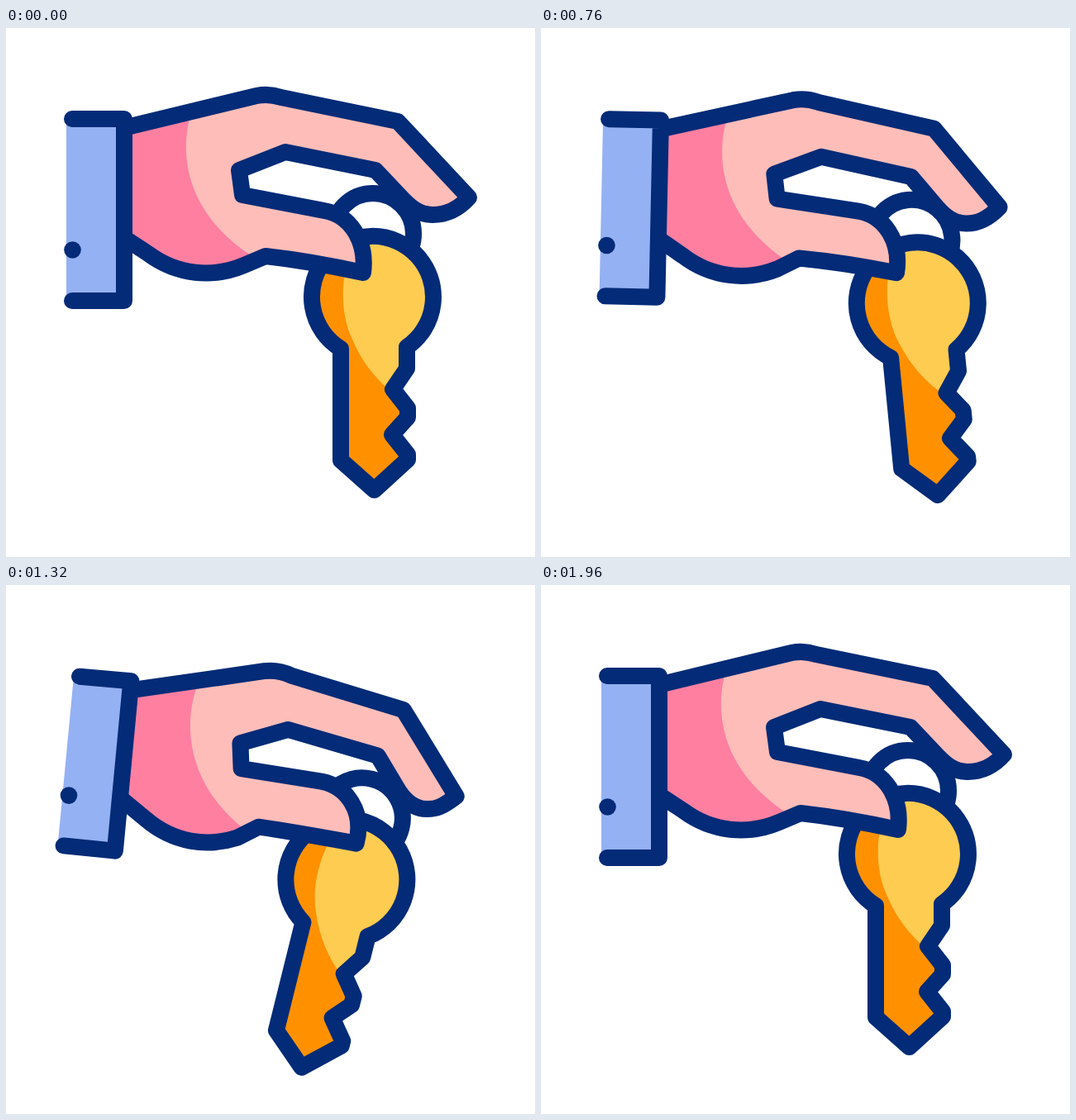
Recreate the animation shown at these times as an HTML page. Size 640 px wide and 640 px high, loop 2 s.

```html
<!DOCTYPE html>
<html lang="en">
<head>
<meta charset="utf-8">
<title>Handing over the key</title>
<style>
  html, body { margin: 0; width: 100%; height: 100%; overflow: hidden; background: #fff; }
  svg { display: block; width: 100%; height: 100%; }
  .line { fill: none; stroke: #032b77; stroke-width: 20; stroke-linecap: round; stroke-linejoin: round; }
</style>
</head>
<body>
<svg viewBox="0 0 640 640">
  <defs>
    <path id="keyShape" d="M405 388 A73.5 73.5 0 1 1 485 386 V412 L468 437 L486 460 V471 L467 492 L486 516 V522 L445.5 559 L405 523 Z"/>
    <path id="handShape"/>
    <clipPath id="inKey"><use href="#keyShape"/></clipPath>
    <clipPath id="inHand"><use href="#handShape"/></clipPath>
  </defs>

  <g id="key">
    <circle class="line" cx="444" cy="249" r="49"/>
    <use href="#keyShape" fill="#ffcc52"/>
    <path clip-path="url(#inKey)" fill="#ff9100" d="M429 245 C402 290 404 342 417 372 C429 402 445 422 466 440 L500 450 V570 H350 V245 Z"/>
    <use href="#keyShape" class="line"/>
  </g>

  <use href="#handShape" fill="#ffbdb9"/>
  <path id="shade" clip-path="url(#inHand)" fill="#ff7fa1"/>
  <use href="#handShape" class="line"/>

  <path id="cuff" fill="#94b1f3"/>
  <path id="cuffLine" class="line"/>
  <circle id="button" r="10.3" fill="#032b77"/>
</svg>
<script>
const LOOP = 2000;
const $ = id => document.getElementById(id);
const sine = u => (1 - Math.cos(Math.PI * u)) / 2;

// Keys are [time, value, warp]; a warp below 1 makes the move start faster.
const drop = [[80, 0], [480, 1, 0.75], [600, 1], [880, -0.36], [1155, 1], [1600, 0]];
const swing = [[80, 0], [380, 14.6, 0.65], [610, 15], [865, -17], [1205, 22], [1540, -8.1], [1960, 0]];
const squash = [[80, 0], [240, 0.4], [480, 0], [600, 0], [880, 1], [1155, 1], [1600, 0]];

function valueAt(keys, t) {
  if (t <= keys[0][0]) return keys[0][1];
  const i = keys.findIndex(k => k[0] > t);
  if (i < 0) return keys[keys.length - 1][1];
  const [t0, a] = keys[i - 1], [t1, b, warp = 1] = keys[i];
  return a + (b - a) * sine(((t - t0) / (t1 - t0)) ** warp);
}

// Each shape has a raised and a lowered path; "give" shifts single coordinates when squashed.
const shapes = {
  handShape: {
    up: 'M146 120 L303 82 Q318 79 333 84 L474 113 L560 205 C546 221 530 226 516 226 C500 226 490 217 481 208 ' +
        'L447 172 L338 150 L282 172 L286 202 L385 221 C415 226 437 256 432 296 C400 289 350 280 314 276 ' +
        'L288 287 C250 303 207 299 172 273 L143 254',
    down: 'M157 130 L316 114 Q334 112 351 121 L484 168 L542 278 C525 289 516 291 507 291 C492 291 481 282 473 268 ' +
        'L451 222 L343 186 L284 200 L284 231 L380 252 C410 258 433 288 420 328 C390 322 340 311 302 303 ' +
        'L276 314 C240 324 200 317 168 288 L138 261',
    give: { 10: -4, 12: -4, 33: -7, 35: -7, 37: -7, 39: -8, 41: -7, 43: -5, 45: -3 }
  },
  shade: {
    up: 'M226 96 C209 145 212 222 302 279 L302 340 L100 340 L100 80 Z',
    down: 'M242 112 C214 165 215 245 285 305 L285 350 L100 350 L100 90 Z'
  },
  cuff: {
    up: 'M73 110 L143 110 L143 330 L73 330 Z',
    down: 'M86 110 L155 119 L127 323 L58 313 Z',
    give: { 5: -5, 7: -5 }
  },
  cuffLine: {
    up: 'M80 110 L143 110 L143 330 L80 330',
    down: 'M93 111 L155 119 L127 323 L65 314',
    give: { 5: -5, 7: -5 }
  }
};
const number = /[\d.]+/g;
for (const s of Object.values(shapes)) s.low = s.down.match(number).map(Number);

function morph({ up, low, give = {} }, p, q) {
  let i = 0;
  return up.replace(number, n => {
    const v = +n + (low[i] - n) * p + (give[i] || 0) * q;
    i++;
    return v.toFixed(2);
  });
}

function draw(now) {
  const t = now % LOOP;
  const p = valueAt(drop, t), q = valueAt(squash, t), angle = valueAt(swing, t);
  for (const id in shapes) $(id).setAttribute('d', morph(shapes[id], p, q));
  $('button').setAttribute('cx', 80.5 - 6.5 * p);
  $('button').setAttribute('cy', 268.5 - 15 * p - 5 * q);
  $('key').setAttribute('transform', `translate(${-2 * p} ${50 * p}) rotate(${angle} 443.5 200)`);
}

const start = performance.now();
function tick() {
  draw(performance.now() - start);
  requestAnimationFrame(tick);
}
tick();
</script>
</body>
</html>
```
